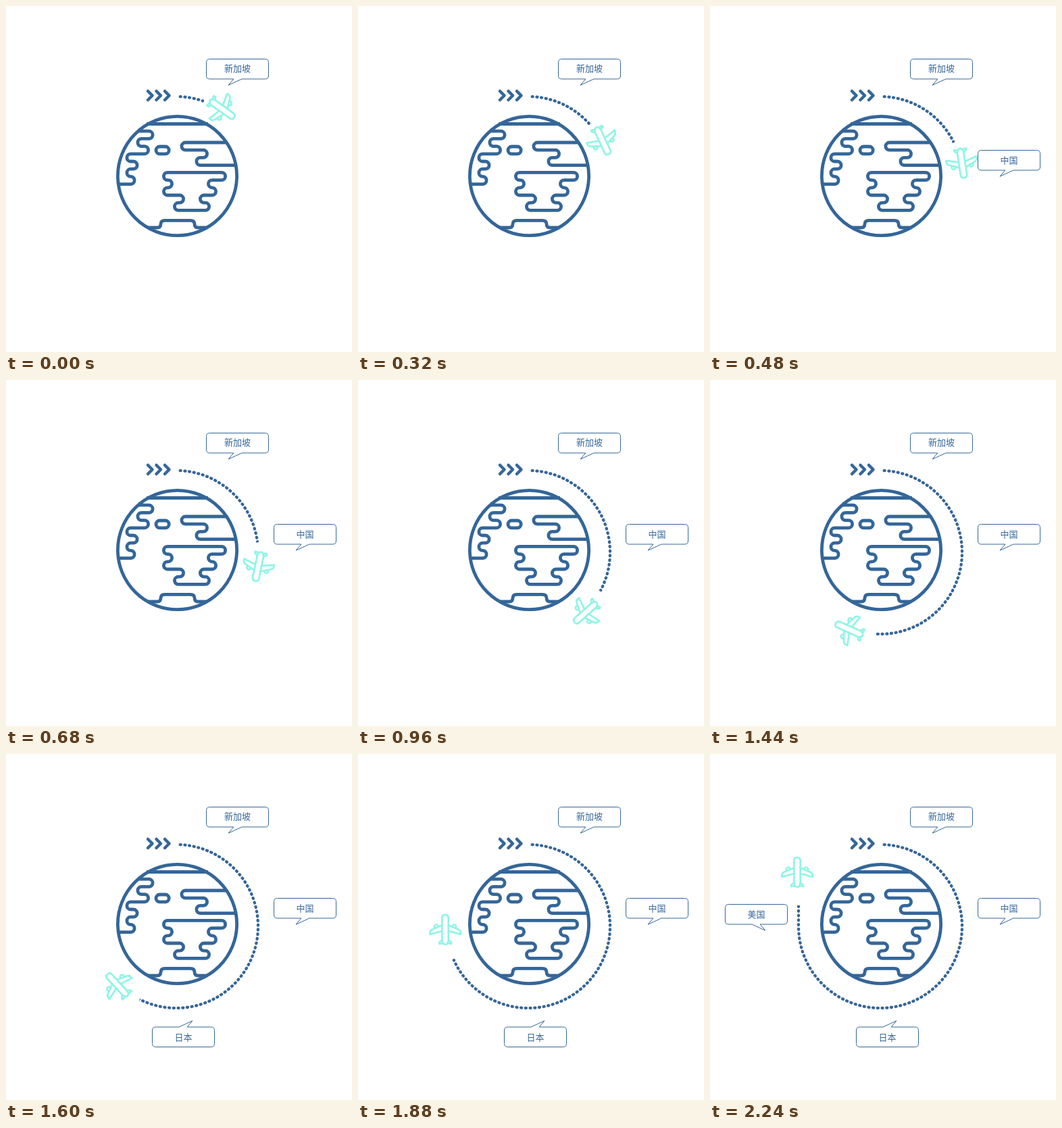
Recreate the animation shown at these times as an HTML page. Size 512 px wide and 512 px high, loop 4960 ms.

```html
<!DOCTYPE html>
<html lang="zh-CN">
<head>
<meta charset="utf-8">
<title>环球航线</title>
<style>
  html, body { margin: 0; width: 100%; height: 100%; overflow: hidden; background: #fff; }
  svg { display: block; width: 100%; height: 100%; }
  .line { fill: none; stroke: #346699; stroke-linecap: round; stroke-linejoin: round; }
  .plane { fill: none; stroke: #8ff5e6; stroke-width: 2.7; stroke-linejoin: round; }
  text { font: 13px "Noto Sans CJK SC", "Noto Sans CJK", sans-serif; fill: #346699; text-anchor: middle; }
</style>
</head>
<body>
<svg viewBox="0 0 512 512">
  <defs>
    <path id="route" d="M254.7 134A121 121 0 1 1 131 255V224"/>
    <mask id="reveal" maskUnits="userSpaceOnUse" x="0" y="0" width="512" height="512">
      <use id="trail" href="#route" fill="none" stroke="#fff" stroke-width="9"/>
    </mask>
    <path id="chevron" d="M210 126L216.5 132.5L210 139"/>
    <path id="bubble" d="M-6 15H-41Q-46 15 -46 10V-9.5Q-46 -14.5 -41 -14.5H41Q46 -14.5 46 -9.5V10Q46 15 41 15H6.5L-13 24Z"/>
    <g id="half">
      <path d="M-4.7 -6.5L-20 0Q-22.7 1.5 -22.7 5V7L-4.7 2"/>
      <path d="M-16 -2V-5.5Q-13.2 -9.5 -10.5 -5.5V-4"/>
      <path d="M-4.5 15.5L-8.8 18.5V21L-3 20"/>
    </g>
  </defs>

  <g class="line" stroke-width="4.8">
    <circle cx="253.5" cy="251.5" r="88.1"/>
    <g id="land" stroke-linecap="butt">
      <path d="M208 174.5H299"/>
      <rect x="222" y="208" width="19.2" height="10.8" rx="5.4"/>
      <path d="M210 328H223Q229 328 229 322.7Q229 317.4 235 317.4H273Q279 317.4 279 322.7Q279 328 285 328H298"/>
    </g>
  </g>
  <g class="line" stroke-width="4.5">
    <use href="#chevron"/>
    <use href="#chevron" x="12.5"/>
    <use href="#chevron" x="25"/>
  </g>
  <g mask="url(#reveal)">
    <use href="#route" class="line" stroke-width="4.3" stroke-dasharray="1 5.74" stroke-dashoffset="-3"/>
  </g>
  <g id="labels"></g>
  <g id="plane" class="plane">
    <path d="M-4.7 16V-17Q-4.7 -22 0 -22Q4.7 -22 4.7 -17V16Q3.5 21.8 0 21.8Q-3.5 21.8 -4.7 16Z"/>
    <use href="#half"/>
    <use href="#half" transform="scale(-1 1)"/>
  </g>
</svg>
<script>
const LOOP = 4960, STEP = 40, FLIGHT_END = 2240;
const svgNS = 'http://www.w3.org/2000/svg';
const byId = id => document.getElementById(id);

function add(parent, tag, attrs) {
  const node = document.createElementNS(svgNS, tag);
  for (const key in attrs) node.setAttribute(key, attrs[key]);
  return parent.appendChild(node);
}

// Coastlines are horizontal runs joined by half-circle turns.
// Each run: end x, then the bulge side of the turn (r/l), and its direction (d/u).
function coast(start, runs, closed) {
  const d = runs.split(' ').map(run => {
    const [, x, side, way] = run.match(/^(\d+\.?\d*)(\w?)(\w?)$/);
    if (!side) return 'H' + x;
    const sweep = (side === 'r') === (way === 'd') ? 1 : 0;
    return `H${x}a5.6 5.6 0 0 ${sweep} 0 ${way === 'd' ? 11.2 : -11.2}`;
  }).join('');
  add(byId('land'), 'path', { d: 'M' + start + d + (closed ? 'Z' : '') });
}
coast('195 185.2', '211.5rd 200.5ld 205rd 184.5ld 188.5rd 184.5ld 184.5rd 166');
coast('326 202', '265.5ld 292ld 341'.replace('292ld', '292rd 287.5ld'));
coast('239 246.4', '319rd 305ld 305rd 293ld 295rd 255lu 257ru 239lu 240ru 239lu', true);

const labels = [
  { text: '新加坡', x: 342.5, y: 93, flip: '1 1', dy: 4, at: 0 },
  { text: '中国', x: 442.5, y: 228, flip: '1 1', dy: 5, at: 480 },
  { text: '日本', x: 262.5, y: 419, flip: '-1 -1', dy: 5, at: 1480 },
  { text: '美国', x: 68.5, y: 237, flip: '-1 1', dy: 5, at: 2080 }
];
for (const label of labels) {
  label.node = add(byId('labels'), 'g', { transform: `translate(${label.x} ${label.y})` });
  add(label.node, 'use', { href: '#bubble', class: 'line', transform: `scale(${label.flip})` });
  add(label.node, 'text', { y: label.dy }).textContent = label.text;
}

// time, trail length, plane bearing around the globe (degrees from the top)
const flight = [
  [0, 39, 33.4], [320, 100.5, 63.2], [680, 172.5, 99.8], [1240, 322, 173],
  [1600, 433.5, 225], [1880, 517.5, 267.7], [FLIGHT_END, 600, 303]
];
function sample(t, column) {
  const i = Math.max(1, flight.findIndex(row => row[0] >= t));
  const a = flight[i - 1], b = flight[i];
  return a[column] + (b[column] - a[column]) * (t - a[0]) / (b[0] - a[0]);
}

function planePose(t) {
  if (t > 1880) return [129, 260 - 85 * (t - 1880) / (FLIGHT_END - 1880), 0];
  const bearing = sample(t, 2), rad = bearing * Math.PI / 180;
  return [252 + 123 * Math.sin(rad), 255 - 123 * Math.cos(rad), bearing + 92];
}

function draw(now) {
  const time = now % LOOP;
  const t = Math.min(FLIGHT_END, Math.floor(time / STEP) * STEP);
  const [x, y, turn] = planePose(t);
  byId('plane').setAttribute('transform', `translate(${x} ${y}) rotate(${turn})`);
  byId('trail').setAttribute('stroke-dasharray', `${sample(t, 1)} 999`);
  for (const label of labels) label.node.style.display = t >= label.at ? '' : 'none';
}

const start = performance.now();
function tick() {
  draw(performance.now() - start);
  requestAnimationFrame(tick);
}
tick();
</script>
</body>
</html>
```
